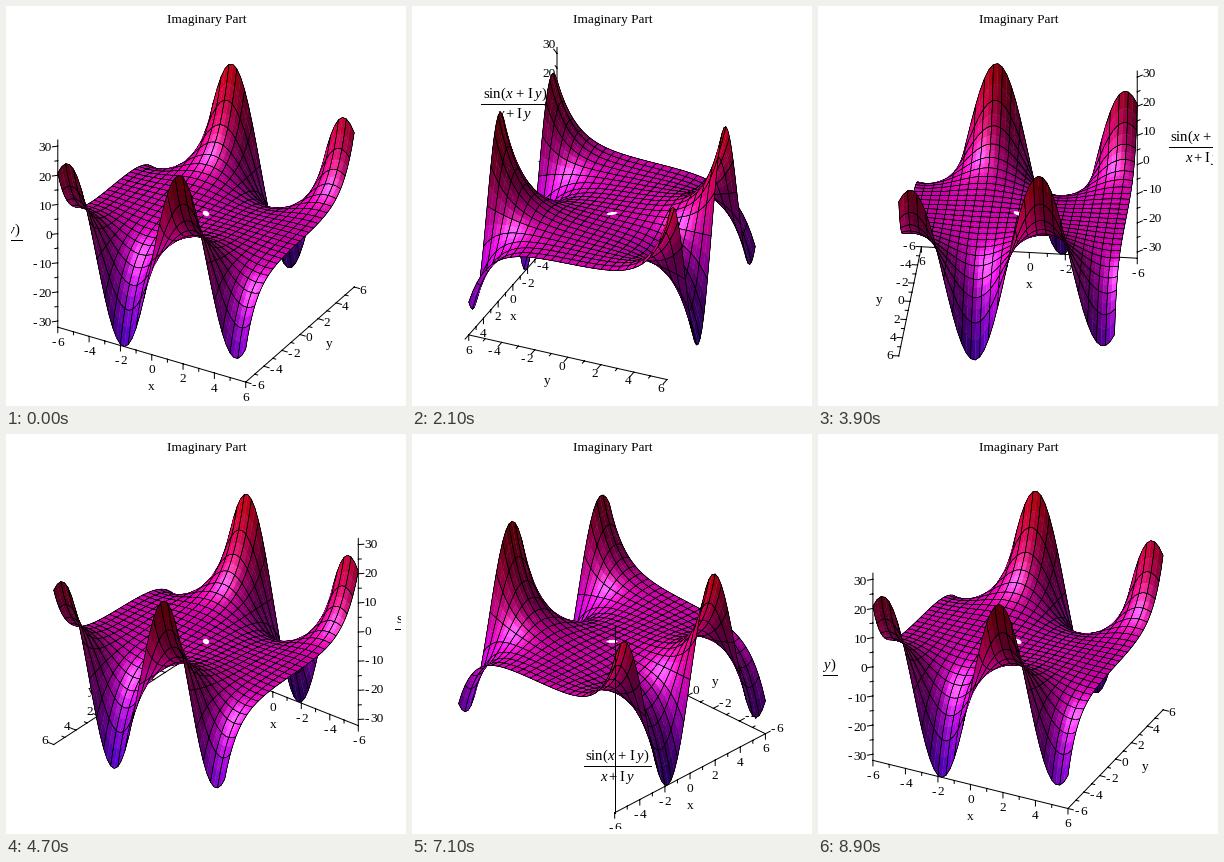
Write a matplotlib script that moves like this. It is 400x400 px and loops after 9000 ms.

```python
import numpy as np
import matplotlib.pyplot as plt
from matplotlib.animation import FuncAnimation
from matplotlib.collections import PolyCollection
from matplotlib.colors import hsv_to_rgb

PX = 0.72                      # points per pixel at 100 dpi
FRAMES, N, R = 90, 48, 6.0
SIDE, TILT = 217.0, 0.506      # box side in px, sine of the elevation
RISE = np.sqrt(1 - TILT ** 2)
CX, CY = 200.0, 207.5

plt.rcParams.update({
    "font.family": "Liberation Serif",
    "font.size": 13 * PX,
    "mathtext.fontset": "custom",
    "mathtext.rm": "Liberation Serif",
    "mathtext.it": "Liberation Serif:italic",
    "mathtext.cal": "Liberation Serif",
})

# surface
t = np.linspace(-R, R, N + 1)
X, Y = np.meshgrid(t, t, indexing="ij")
W = X + 1j * Y
W[N // 2, N // 2] = 1
Z = (np.sin(W) / W).imag
ZMAX = np.abs(Z).max()

I, J = (a.ravel() for a in np.meshgrid(np.arange(N), np.arange(N), indexing="ij"))
face = np.stack([I, I + 1, I + 1, I]), np.stack([J, J, J + 1, J + 1])
# every small cell owns one corner of the coarser black grid
ci, cj = I + I % 2, J + J % 2
oi, oj = I + 1 - I % 2, J + 1 - J % 2
ell = np.stack([oi, ci, ci, ci]), np.stack([cj, cj, oj, cj])

# unit normals and hues per cell
zu = Z / (2 * ZMAX)
step = 1 / N
z00, z10, z11, z01 = zu[face]
gx = (z10 + z11 - z00 - z01) / (2 * step)
gy = (z01 + z11 - z00 - z10) / (2 * step)
normal = np.stack([-gx, -gy, np.ones_like(gx)])
normal /= np.linalg.norm(normal, axis=0)
height = (z00 + z10 + z11 + z01) / 4 + 0.5
base = hsv_to_rgb(np.stack([0.73 + 0.265 * height,
                            np.ones_like(height), np.ones_like(height)], axis=1))
mid_x, mid_y = t[I] + R / N, t[J] + R / N

# hole at the undefined centre point
m = N // 2
cell = lambda i, j: i * N + j
gone = [cell(m, m - 1), cell(m - 1, m)]
cut = [cell(m, m), cell(m - 1, m - 1)]

# light, in (right, up, towards viewer) coordinates
light = np.array([-0.68, 0.7, 0.1])
light /= np.linalg.norm(light)
half = light + np.array([0, TILT, RISE])
half /= np.linalg.norm(half)


def project(x, y, z, c, s):
    k = SIDE / (2 * R)
    return (CX + k * (x * c + y * s),
            CY + k * TILT * (x * s - y * c) - z * SIDE * RISE / (2 * ZMAX))


def shade(c, s):
    nx, ny, nz = normal
    n = np.stack([nx * c + ny * s, nz, nx * s - ny * c])
    diffuse = np.clip(light @ n, 0, 1)
    shine = np.clip(half @ n, 0, 1) ** 18
    rgb = base * (0.34 + 0.63 * diffuse)[:, None] + 0.42 * shine[:, None]
    return np.clip(rgb, 0, 1)


fig = plt.figure(figsize=(4, 4), dpi=100, facecolor="white")
fig.text(201 / 400, 1 - 14 / 400, "Imaginary Part", ha="center", va="center",
         fontsize=13.2 * PX)
ax = fig.add_axes([5 / 400, 5 / 400, 390 / 400, 370 / 400])
ax.set_xlim(5, 395)
ax.set_ylim(395, 25)
ax.axis("off")
ax.autoscale(False)
mesh = PolyCollection([], zorder=2, linewidths=[0.4 * PX, 0.45 * PX])
ax.add_collection(mesh, autolim=False)
placed = []


def text(x, y, s, z, size=13.4):
    ax.text(x, y + 0.7, s, ha="center", va="center", fontsize=size * PX,
            zorder=z, clip_on=True)


def number(x, y, v, u, z):
    """Tick label pushed away from (x, y) along u, unless it hits another."""
    digits = str(abs(v))
    wd = 6.7 * len(digits)
    w = wd + (6.5 if v < 0 else 0)
    if u is None:
        y += 15
    else:
        x += u[0] * (6 + w / 2)
        y += u[1] * 11.5
    if any(abs(x - a) < (w + b) / 2 and abs(y - h) < 9 for a, h, b in placed):
        return
    placed.append((x, y, w))
    text(x + (w - wd) / 2, y, digits, z)
    if v < 0:
        text(x - w / 2 + 2.8, y + 0.5, "-", z)


def axis(point, lim, minor, major, u, z):
    """Axis line with ticks; u is None for labels straight below."""
    d = (0, 1) if u is None else u
    (x0, y0), (x1, y1) = point(-lim), point(lim)
    xs, ys = [x0, x1], [y0, y1]
    top = int(lim // minor) * minor
    # ticks that would run along the line itself are left out
    along = x0 == x1 and abs(d[0]) < 0.15
    for v in () if along else range(-top, top + 1, minor):
        x, y = point(v)
        size = 3 if v % major else 5.5
        xs += [np.nan, x, x + size * d[0]]
        ys += [np.nan, y, y + size * d[1]]
        if v % major == 0:
            number(x, y, v, u, z)
    ax.plot(xs, ys, color="black", lw=PX, zorder=z)


def unit(x, y):
    r = np.hypot(x, y)
    return x / r, y / r


def formula(x, y, z):
    text(x, y - 10, r"$\mathrm{sin}(x\,+\,\mathrm{I}\,y)$", z, 14.7)
    text(x, y + 10.5, r"$x+\mathrm{I}\,y$", z, 14.7)
    ax.plot([x - 33.5, x + 33.5], [y, y], color="black", lw=PX, zorder=z)


def draw_mesh(c, s):
    px, py = project(X, Y, Z, c, s)
    P = np.stack([px, py], axis=-1)
    quads = P[face].transpose(1, 0, 2)
    lines = P[ell].transpose(1, 0, 2)
    quads[cut[0], 0] = quads[cut[0], 1]
    quads[cut[1], 2] = quads[cut[1], 1]

    fill = np.zeros((N * N, 2, 4))
    fill[:, 0, :3] = shade(c, s)
    fill[:, 0, 3] = 1
    fill[gone, 0, 3] = 0
    edge = fill.copy()
    edge[:, 1] = (0, 0, 0, 1)
    edge[gone + cut, 1, 3] = 0

    order = np.argsort(mid_x * s - mid_y * c)
    mesh.set_verts(np.stack([quads, lines], axis=1)[order].reshape(-1, 4, 2))
    mesh.set_facecolor(fill[order].reshape(-1, 4))
    mesh.set_edgecolor(edge[order].reshape(-1, 4))


def update(k):
    a = np.radians(30 + 360 * k / FRAMES)
    c, s = np.cos(a), np.sin(a)
    for art in list(ax.texts) + list(ax.lines):
        art.remove()
    placed.clear()
    draw_mesh(c, s)
    layer = lambda towards: 3 if towards > 0 else 1

    z = layer(c)
    at_x = lambda v: project(v, -R, -ZMAX, c, s)
    axis(at_x, R, 1, 2, None, z)
    x, y = at_x(0)
    text(x, y + 32, "x", z)

    z = layer(s)
    u = unit(c, s * TILT)
    at_y = lambda v: project(R, v, -ZMAX, c, s)
    axis(at_y, R, 1, 2, u, z)
    x, y = at_y(0)
    text(x + 31 * u[0], y + 31 * u[1], "y", z)

    z = layer(c - s)
    u = unit(-c - s, (c - s) * TILT)
    at_z = lambda v: project(-R, -R, v, c, s)
    axis(at_z, ZMAX, 5, 10, u, z)
    x, y = at_z(0)
    formula(x + 70 * u[0], y + 47 * u[1], z)


anim = FuncAnimation(fig, update, frames=FRAMES, interval=100,
                     init_func=lambda: None, repeat=True, repeat_delay=0)
plt.show()
```
